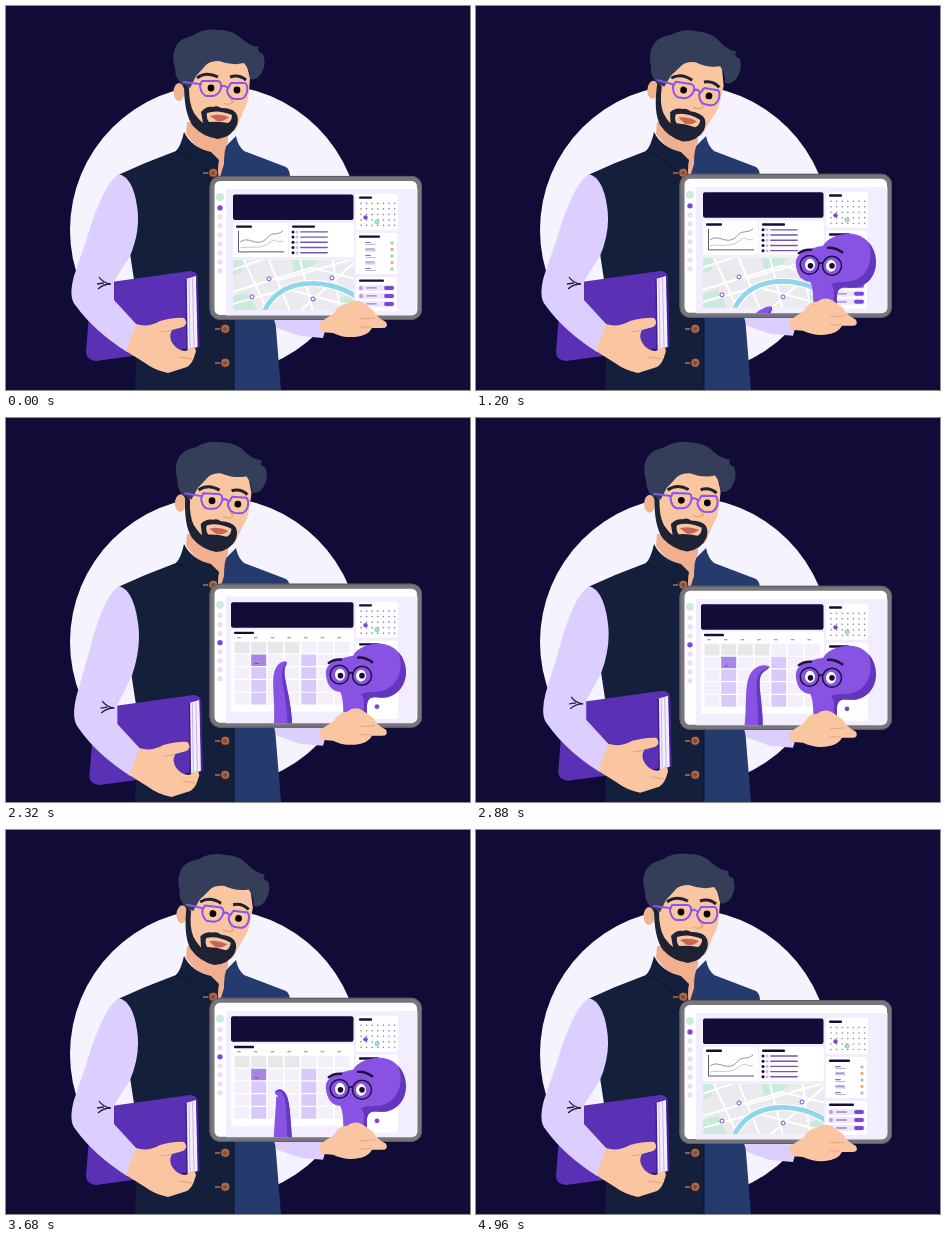
These frames come from a looping animation (464 by 384 pixels, 5040 ms). An HTML page:

```html
<!DOCTYPE html>
<html lang="en">
<head>
<meta charset="utf-8">
<title>Tablet helper</title>
<style>
  html, body { margin: 0; width: 100%; height: 100%; overflow: hidden; background: #110b37; }
  svg { display: block; width: 464px; height: 384px; }
</style>
</head>
<body>
<svg viewBox="0 0 464 384">
  <defs>
    <clipPath id="screen"><rect x="208" y="175" width="203.500" height="134.500" rx="6"/></clipPath>
    <clipPath id="map"><rect x="227" y="254" width="121" height="50" rx="2"/></clipPath>
  </defs>
  <circle cx="209" cy="224" r="145" fill="#f5f3fe"/>

  <!-- body -->
  <path fill="#253b6e" d="M220 140L230 130Q232 140 238 145L280 161Q285 164 284 176L269 310L275 384H200L210 165Z"/>
  <path fill="#f0b090" d="M181 116H222V136Q218 142 218 158L213 174L206 160L180 128Z"/>
  <path fill="#131f3b" d="M178 126Q186 142 205 146L213 154Q211 164 213 174L228 300V384H129L132 300L112 169Q140 156 170 145Q175 140 178 126Z"/>
  <path fill="none" stroke="#0b142b" d="M170 145Q192 152 207 174M215 172L228 310V384"/>
  <g id="buttons"></g>

  <g id="leftArm">
    <g id="book">
      <path fill="#5a31b4" d="M98 277L184 265Q191 265 192 272L193 341L90 355Q80 354 80 346L84 296Z"/>
      <path fill="#f4efff" d="M180 273L190 270L191.500 341L181 344Z"/>
      <path fill="none" stroke="#b8a2ea" stroke-width=".8" d="M183 273L184 343M186.500 272L188 342"/>
      <path fill="none" stroke="#40208d" stroke-width="1.500" d="M180 273L181 345M191 270L193 341"/>
    </g>
    <path id="sleeve" fill="#dccfff"/>
    <g id="leftHand">
      <path fill="none" stroke="#25213f" stroke-width="1.300" d="M93 271Q97 277 105 278M92 283Q97 278 105 278M91 278L98 277"/>
      <path fill="#fac6a2" d="M130 318Q142 322 154 315Q170 311 178 312Q183 317 177 321L166 324Q162 331 167 338Q172 345 180 345L188 340Q191 345 189 348Q187 357 181 361L162 367Q148 364 139 357L120 345Z"/>
      <path fill="none" stroke="#dc9d7c" stroke-width=".9" d="M166 324Q160 326 155 326M173 351L186 353"/>
    </g>
  </g>

  <g id="head">
    <ellipse cx="173" cy="86" rx="5.500" ry="9" fill="#f0b48f"/>
    <path id="skin" fill="#fac6a2" d="M180 62L200 48H238L244 72L243 86Q242 98 237 106L230 124L210 132L188 118L179 96Z"/>
    <path fill="#343e58" d="M178 80Q169 74 169 62Q165 50 170 40Q175 32 186 30Q198 22 212 24Q228 24 236 33Q244 40 253 41Q250 46 257 48Q261 58 255 68Q250 75 244 73Q244 64 238 57Q226 60 213 55Q203 55 199 60Q194 66 190 70L184 82Z"/>
    <g id="features">
      <path fill="#1d2234" d="M178 78L183 82Q183 98 188 107Q193 114 197 117L195 106Q200 100 207 101Q211 99 215 102Q226 102 230 107Q233 112 231 119Q226 131 212 133Q197 131 187 120Q178 108 178 78Z"/>
      <path fill="#fac6a2" d="M201 107Q212 103 226 109Q226 115 222 117Q212 115 203 116Q200 112 201 107Z"/>
      <path fill="#c76658" d="M204 110Q213 107 223 111Q218 116 211 115Z"/>
      <path fill="none" stroke="#e2a17e" stroke-width="1.200" d="M221 85Q224 93 227 96Q223 100 217 97"/>
      <path fill="none" stroke="#1d2234" stroke-width="3" d="M191 72Q200 65 212 71M224 71Q233 68 240 74"/>
      <circle cx="205" cy="82" r="3.400"/><circle cx="231" cy="84" r="3.400"/>
      <path fill="none" stroke="#8955ea" stroke-width="2" stroke-linejoin="round" d="M177 76L194 78M196 75H211Q216 75 215 82Q213 89 207 90H200Q195 88 194 80ZM225 77H239Q242 79 241 86Q239 93 234 93H228Q222 91 221 84ZM215 81Q218 78 222 82"/>
    </g>
  </g>

  <g id="tablet">
    <path fill="#dccfff" d="M266 308H324L317 332L294 330L271 322Z"/>
    <rect x="206" y="172.500" width="207.500" height="139" rx="8" fill="#fff" stroke="#76767b" stroke-width="5"/>
    <rect x="204" y="170.500" width="211.500" height="143" rx="10" fill="none" stroke="#5b5b62"/>
    <g clip-path="url(#screen)">
      <rect x="220" y="183" width="192" height="128" fill="#f3eeff"/>
      <g id="nav"></g>
      <g id="common"></g>
      <g id="dashboard"></g>
      <g id="planner"></g>
      <g id="popup">
        <rect x="278" y="206" width="63" height="66" rx="5" fill="#fff"/>
      </g>
      <path id="tentacle" fill="#8852e3"/>
      <path id="tentacleShade" fill="#6537c3"/>
      <g id="badge">
        <circle cx="310" cy="240.500" r="14.500" fill="#fff" stroke="#8852e3" stroke-width="2"/>
        <path fill="none" stroke="#17113b" stroke-width="2.500" d="M304 241L308 245L316 236"/>
      </g>
      <g id="octopus">
        <path fill="#8852e3" d="M320 262C318 249 332 245 347 242C352 233 366 229 376 230C392 232 400 246 399 259C398 277 386 285 376 284C367 283 362 283 361 291V330H336C338 300 338 284 334 278C326 278 321 271 320 262Z"/>
        <path fill="#6236bd" d="M392 238C399 254 392 276 372 278C362 279 358 278 355 281C361 286 356 294 357 330H361V291C362 283 367 283 376 284C404 282 405 250 392 238Z"/>
        <path fill="none" stroke="#1b133e" stroke-width="2.500" d="M322 250Q328 245 336 246M351 244Q359 243 367 249"/>
        <g fill="#fff"><ellipse cx="334" cy="261" rx="5" ry="6"/><ellipse cx="355" cy="262" rx="5" ry="6"/></g>
        <g fill="#15112e"><circle cx="334.500" cy="262" r="2.800"/><circle cx="356" cy="262" r="2.800"/></g>
        <g fill="none" stroke="#1b133e" stroke-width="1.500"><circle cx="333.500" cy="261" r="9.300"/><circle cx="356" cy="262" r="9.500"/><path d="M343 260Q345 258 347 260"/></g>
      </g>
    </g>
    <path fill="#fac6a2" d="M313 317L328 307Q333 298 341 298Q349 292 357 297L367 304Q370 311 380 316Q383 322 376 322H366Q362 330 349 331Q337 332 327 327L315 326Z"/>
    <path fill="none" stroke="#e2a17e" stroke-width=".9" d="M369 312L354 313M365 321L354 321"/>
  </g>
</svg>
<script>
const LOOP = 5040, STEP = 80;
const $ = id => document.getElementById(id);
const navy = '#140d3a', violet = '#7949d4';
const range = n => [...Array(n).keys()];

const rect = (x, y, w, h, fill, r = 1) => `<rect x="${x}" y="${y}" width="${w}" height="${h}" rx="${r}" fill="${fill}"/>`;
const dot = (x, y, r, fill, extra = '') => `<circle cx="${x}" cy="${y}" r="${r}" fill="${fill}" ${extra}/>`;
const line = (d, stroke, width = 1) => `<path d="${d}" fill="none" stroke="${stroke}" stroke-width="${width}"/>`;
const card = (x, y, w, h, title) => rect(x, y, w, h, '#fff', 2) + rect(x + 3, y + 2.5, title, 2.4, navy);

$('buttons').innerHTML = [[207, 167], [219, 323], [219, 357]].map(([x, y]) =>
  line(`M${x - 10} ${y}H${x}`, '#a96b4d', 1.6) + dot(x, y, 5, '#3c2428') + dot(x + .3, y - .3, 4, '#a96b4d') + dot(x, y, 2, '#7c4b3a')).join('');

function drawNav(active) {
  return dot(214, 191, 4, '#c9ecdc') + range(8).map(i =>
    dot(214, 202 + 9 * i, 2.7, i === active ? violet : '#e5e1ee')).join('');
}

function drawCommon() {
  const days = range(35).map(i => dot(355 + i % 7 * 5.6, 197.5 + (i / 7 | 0) * 5.5, .8, '#8d84a8')).join('');
  return rect(227, 188.5, 120.5, 25.500, navy, 2) + card(350, 188, 42, 36, 13) + days +
    dot(359.5, 211.5, 2.2, violet) + dot(371, 216, 2.2, '#a8e2cb', 'stroke="#62bea0" stroke-width=".6"');
}

function drawMap() {
  const roads = 'M220 266L262 252L286 310M236 250L262 306M227 286L305 262L350 273M270 275L352 252M293 250L308 310M326 250L335 310M220 300L280 283L352 302M348 257L293 306';
  const pins = [[246, 291], [263, 273], [307, 293], [326, 272]];
  return '<g clip-path="url(#map)">' + rect(227, 254, 121, 50, '#ebeaee') +
    '<path fill="#caeadc" d="M227 254H239L235 267L227 270ZM227 290L242 286L251 304H227ZM286 254H313L302 264L288 267ZM331 293L348 288V304H334Z"/>' +
    line(roads, '#fff', 2) + line('M256 312C268 270 322 270 352 292', '#fff', 7) +
    line('M256 312C268 270 322 270 352 292', '#91d5ec', 4.8) +
    pins.map(([x, y]) => dot(x, y, 2, '#fff', `stroke="${violet}" stroke-width="1"`)).join('') + '</g>';
}

function drawDashboard() {
  const list = range(5).map(i => {
    const y = 226 + 5.2 * i;
    return dot(287, y, 1.5, navy) + dot(291, y, 1.5, '#c9b9ef') + rect(294, y - .7, 28, 1.4, '#7556b5');
  }).join('');
  const tasks = range(5).map(i => {
    const y = 237 + 6.5 * i;
    return rect(359, y - 1, 6 + i % 2 * 4, 1.2, '#8b6bc9') + rect(359, y + 1, 11, .8, '#aaa0bd') +
      rect(384.5, y - 1.5, 3, 3, i % 2 ? '#f2a672' : '#8dd5b6');
  }).join('');
  const people = range(3).map(i => {
    const y = 282 + 8 * i;
    return rect(352, y - 3, 37, 6, '#eee7ff', 3) + dot(355, y, 2, '#b89aec') +
      rect(360, y - .7, 11, 1.4, '#9b87be') + rect(378, y - 2, 10, 4, violet, 2);
  }).join('');
  return card(227, 217, 55, 34, 16) + line('M232.500 225V246H278', '#4b465d', .9) +
    line('M234 236C240 232 244 235 249 236S258 236 262 231S271 230 277 225', '#69617e', .7) +
    line('M234 242C246 240 254 244 263 237S270 239 277 235', '#b8a4e4', .7) +
    card(283, 217, 65, 34, 23) + list + drawMap() +
    card(350, 227, 41, 41, 21) + tasks + card(350, 271, 41, 34, 25) + people;
}

function drawPlanner(extra) {
  const cells = range(35).map(i => {
    const col = i % 7, row = i / 7 | 0;
    const deep = col === 1 && (row === 1 || extra && row === 3);
    const fill = !row && col < 4 ? '#e8e7e9' : deep ? '#a985e5'
      : row && (col === 1 || col === 4) ? '#d9c8fa' : '#f3effb';
    return rect(228.5 + 16.7 * col, 228 + 12.8 * row, 15, 11.6, fill, .5) +
      (deep ? rect(232 + 16.7 * col, 236.5 + 12.8 * row, 4, 1, '#7045b8') : '');
  }).join('');
  const heads = range(7).map(i => rect(231 + 16.7 * i, 223.5, 4, 1, '#8a839d')).join('');
  return rect(225, 188.5, 5, 25.5, navy, 2) + rect(225, 216, 123, 82, '#fff', 2) +
    rect(228, 218, 20, 2.4, navy) + heads + cells +
    card(350, 227, 42, 78, 20) + dot(371, 293, 2.4, violet);
}

$('common').innerHTML = drawCommon();
$('dashboard').innerHTML = drawDashboard();

// Tracks are rows of [time, ...values], eased between rows.
function track(rows, t) {
  const i = rows.findIndex(row => row[0] > t);
  if (i < 1) return rows.at(i).slice(1);
  const a = rows[i - 1], b = rows[i];
  const k = .5 - .5 * Math.cos(Math.PI * (t - a[0]) / (b[0] - a[0]));
  return a.slice(1).map((v, j) => v + (b[j + 1] - v) * k);
}

const tilt = [[0, 0], [560, 5], [1200, 4.8], [1760, 3.6], [2720, .7], [3360, .8], [3680, 3.6], [4320, 2], [4800, 0], [LOOP, 0]];
const reach = [[1760, 0], [2400, 1], [2480, 1], [3440, 0], [LOOP, 0]];
const rise = [[80, 95], [560, 0], [4480, 0], [4880, 95], [LOOP, 95]];
const popScale = [[3840, 0], [4160, 1], [4480, 1], [4720, 0], [LOOP, 0]];

const hidden = [278, 350, 278, 342, 279, 336, 283, 330];
const peek = [278, 326, 281, 316, 286, 311, 296, 303];
const point = [276, 318, 269, 275, 252, 265, 225, 237];
const hook = [277, 318, 281, 278, 268, 254, 294, 251];
const press = [277, 318, 276, 282, 279, 260, 269, 266];
const hold = [276, 318, 258, 276, 287, 280, 303, 252];
const arm = [[320, ...hidden], [640, ...peek], [1200, ...peek], [1680, ...point], [1920, ...point],
  [2480, ...hook], [3200, ...hook], [3600, ...press], [3760, ...press], [4160, ...hold],
  [4480, ...hold], [4800, ...hidden], [LOOP, ...hidden]];

function drawTentacle([x0, y0, x1, y1, x2, y2, x3, y3]) {
  const left = [], mid = [], right = [];
  for (const i of range(25)) {
    const u = i / 24, v = 1 - u;
    const bez = (a, b, c, d) => v * v * v * a + 3 * v * v * u * b + 3 * v * u * u * c + u * u * u * d;
    const slope = (a, b, c, d) => v * v * (b - a) + 2 * v * u * (c - b) + u * u * (d - c);
    const x = bez(x0, x1, x2, x3), y = bez(y0, y1, y2, y3);
    const dx = slope(x0, x1, x2, x3), dy = slope(y0, y1, y2, y3);
    const w = (9.5 - 6 * u) * Math.sqrt(1 - u ** 8) / Math.hypot(dx, dy);
    left.push([x + dy * w, y - dx * w]);
    mid.push([x - dy * w * .5, y + dx * w * .5]);
    right.unshift([x - dy * w, y + dx * w]);
  }
  $('tentacle').setAttribute('d', `M${[...left, ...right].join('L')}Z`);
  $('tentacleShade').setAttribute('d', `M${[...mid, ...right].join('L')}Z`);
}

function drawSleeve(k) {
  const p = (x, y, f) => `${x + 3.5 * k * f} ${y + 12.5 * k * f}`;
  $('sleeve').setAttribute('d', `M113 168Q127 172 ${p(131, 200, .2)}Q${p(135, 224, .3)} ${p(124, 250, .6)}
    L${p(108, 275, 1)}L${p(108, 294, 1)}L${p(131, 319, 1)}L${p(121, 346, 1)}
    Q${p(88, 325, 1)} ${p(70, 300, .9)}Q${p(62, 292, .8)} ${p(68, 270, .7)}L${p(81, 232, .4)}Q97 178 113 168Z`);
}

const move = (id, value) => $(id).setAttribute('transform', value);
const show = (id, on) => $(id).setAttribute('display', on ? 'inline' : 'none');
let pageState = '';

function render(t) {
  const [k] = track(reach, t), [scale] = track(popScale, t), [angle] = track(tilt, t);
  move('head', `rotate(${angle} 202 132)`);
  // The face turns further than the hair.
  for (const id of ['skin', 'features']) move(id, `translate(${-.3 * angle} ${.36 * angle}) rotate(${.8 * angle} 205 82)`);
  move('tablet', `translate(0 ${2.3 * Math.cos(2 * Math.PI * (t + 80) / 1680) - 2.3})`);
  move('octopus', `translate(0 ${track(rise, t)[0]})`);
  for (const id of ['book', 'leftHand']) move(id, `translate(${3.5 * k} ${12.5 * k})`);
  drawSleeve(k);
  drawTentacle(track(arm, t));
  for (const id of ['popup', 'badge']) move(id, `translate(310 240) scale(${scale}) translate(-310 -240)`);

  const planner = t >= 1920 && t < 4720, extra = t >= 3760;
  const state = `${planner}${extra}`;
  if (state === pageState) return;
  pageState = state;
  show('dashboard', !planner);
  show('planner', planner);
  $('nav').innerHTML = drawNav(planner ? 3 : 0);
  $('planner').innerHTML = drawPlanner(extra);
}

const start = performance.now();
function tick() {
  const t = (performance.now() - start) % LOOP;
  render(Math.floor(t / STEP) * STEP);
  requestAnimationFrame(tick);
}
tick();
</script>
</body>
</html>
```
